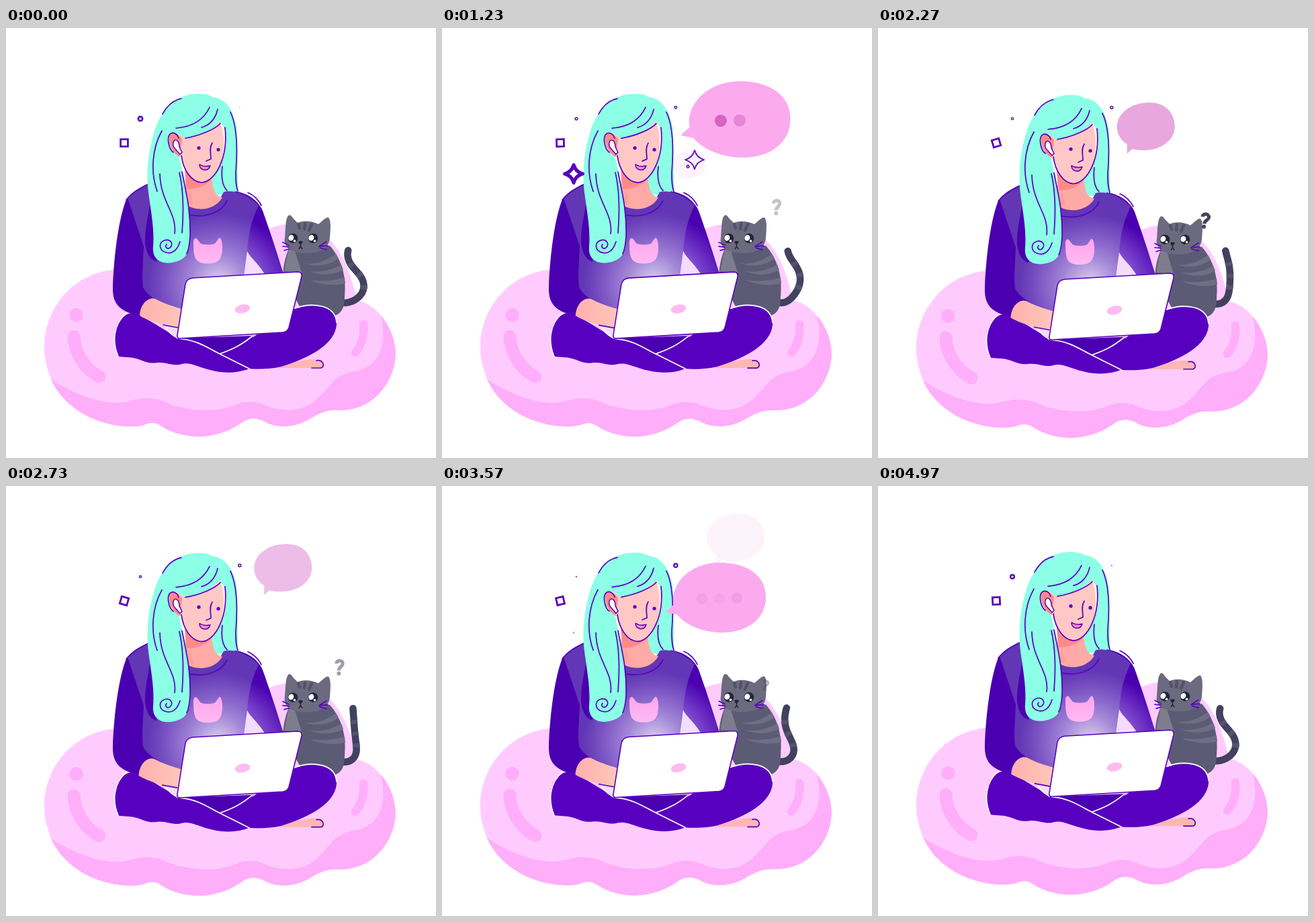
Animation, 640 px wide and 640 px high, one loop 5.01 s. Source, as an HTML page:

```html
<!DOCTYPE html>
<html lang="en">
<head>
<meta charset="utf-8">
<title>Cosy coding</title>
<style>
  html, body { margin: 0; width: 100%; height: 100%; overflow: hidden; background: #fff; }
  svg { display: block; width: 100vw; height: 100vh; }
  .line { fill: none; stroke: #5800bf; stroke-width: 1.7; stroke-linecap: round; stroke-linejoin: round; }
  .white { fill: none; stroke: #fff; stroke-width: 1.7; stroke-linecap: round; }
  .soft { fill: none; stroke: #ffaefa; stroke-linecap: round; }
  .star { fill: #fff; stroke: #5800bf; stroke-linejoin: round; }
  .ring { fill: #fff; stroke: #5800bf; }
</style>
</head>
<body>
<svg viewBox="0 0 640 640">
  <defs>
    <radialGradient id="glow" gradientUnits="userSpaceOnUse" cx="316" cy="380" r="106">
      <stop offset="0" stop-color="#fff" stop-opacity=".8"/>
      <stop offset=".4" stop-color="#efe6ff" stop-opacity=".45"/>
      <stop offset="1" stop-color="#d9c8ff" stop-opacity="0"/>
    </radialGradient>
    <linearGradient id="arm" x1="0" y1="0" x2="0" y2="1">
      <stop offset=".4" stop-color="#4a00b0"/>
      <stop offset="1" stop-color="#5614ba"/>
    </linearGradient>
    <linearGradient id="skin" x1="0" y1="0" x2="1" y2="0">
      <stop offset="0" stop-color="#ffb0ae"/>
      <stop offset="1" stop-color="#ffc6ba"/>
    </linearGradient>
    <linearGradient id="badge" x1="0" y1="0" x2="0" y2="1">
      <stop offset="0" stop-color="#ffa6ee"/>
      <stop offset="1" stop-color="#ffb9f2"/>
    </linearGradient>
    <path id="cloud" d="M57 475C57 430 85 375 150 361C230 350 330 350 375 310C400 287 440 287 470 305C500 325 515 370 522 405C555 412 580 450 580 487C577 530 545 570 495 569C478 568 470 572 455 580C430 597 400 595 385 586C372 579 360 580 350 588C325 605 300 609 280 608C255 606 240 598 232 593C222 586 215 587 205 591C180 598 100 590 68 525C60 505 57 490 57 475Z"/>
    <clipPath id="inCloud"><use href="#cloud"/></clipPath>
    <clipPath id="inTop">
      <path d="M213 231L177 258C166 290 160 350 159 385C158 410 170 422 200 428L258 420H300L354 368L359 334L385 366H413C402 330 392 300 382 272L345 243L322 252L268 265Z"/>
    </clipPath>
    <path id="star" d="M0-14Q3-3 14 0Q3 3 0 14Q-3 3-14 0Q-3-3 0-14Z"/>
  </defs>

  <g id="scene">
    <!-- cloud -->
    <use href="#cloud" fill="#ffcbff"/>
    <path clip-path="url(#inCloud)" fill="#ffaefa" d="M558 430C566 460 562 503 520 511C490 515 485 530 470 545C440 580 400 568 380 559C360 552 345 560 330 565C300 573 260 567 240 558C220 548 200 550 185 555C150 565 100 545 66 522L50 640H600V430Z"/>
    <circle cx="104.500" cy="427" r="10.300" fill="#ffaefa"/>
    <path class="soft" stroke-width="19" d="M101 459C102 485 118 508 139 519"/>
    <path class="soft" stroke-width="12.500" d="M532 441C534 458 528 474 520 483"/>

    <!-- cat -->
    <g fill="none" stroke-width="10.500" stroke-linejoin="round">
      <path id="tail" stroke="#42415f" stroke-linecap="round"/>
      <path id="bands" stroke="#54536e" pathLength="100" stroke-dasharray="0 40 6 12 6 12 6 100"/>
    </g>
    <path fill="#5c5b75" d="M421 328C416 340 413 352 412 368L440 420L490 428C500 424 504 416 504 400C507 370 500 345 482 324Z"/>
    <path fill="#6f6e83" d="M444 350C462 353 480 345 491 336L495 343C482 353 462 357 444 350ZM451 362C470 365 490 358 499 352L502 360C487 368 468 369 451 362ZM452 375C472 378 490 376 504 371L505 380C488 384 468 383 452 375Z"/>
    <path fill="#9a99a3" opacity=".55" d="M421 328L414 362L440 364L430 332Z"/>
    <path fill="#6b6a7f" d="M415 312C416 300 416 286 419 281C421 276 425 279 427 283L434 290C443 286 455 287 465 292C470 288 476 281 480 282C484 286 483 300 482 312C481 328 466 336 446 335C425 335 412 326 415 312Z"/>
    <path fill="none" stroke="#535269" stroke-width="4.500" stroke-linecap="round" d="M435 292L437 298M445 291L444 299M455 292L451 301"/>
    <g id="eye">
      <circle cx="427" cy="313" r="7.300" fill="#25253a"/>
      <ellipse cx="424.500" cy="312.500" rx="3.900" ry="4.500" fill="#fff" transform="rotate(25 425 312)"/>
      <circle cx="429.500" cy="317" r="1.800" fill="#fff"/>
    </g>
    <use href="#eye" x="30"/>
    <path fill="#25253a" d="M435 318Q438 316 442 318Q440 322 438.500 322Q436 322 435 318Z"/>
    <path fill="none" stroke="#25253a" stroke-width="1.500" d="M438.500 321V325L436 329M438.500 325L441 329"/>
    <path class="line" d="M466 325L477 318M467 325L479 324M467 327L477 330M412 319L421 323M412 325L421 326M414 331L421 329"/>

    <!-- body -->
    <path fill="#8cffe6" d="M300 205L307 238C309 250 320 251 330 245L346 244C343 220 347 165 342 145C336 120 320 105 308 103Z"/>
    <path fill="#f4dcff" d="M358 325L354 370H388Z"/>
    <path fill="#4a00b0" d="M213 231C195 239 182 248 178 258C166 290 160 350 159 385C158 412 170 422 200 429L240 420L225 300Z"/>
    <path fill="url(#arm)" d="M340 243C365 246 378 262 382 272C392 300 402 330 413 366H385C375 350 362 340 359 332Z"/>
    <path fill="#6236b5" d="M181 253C190 244 200 237 213 232L268 262C290 274 312 268 324 244C340 240 362 249 376 264C368 282 362 296 359 332L354 368L300 420H258C235 412 212 402 204 386C202 370 204 350 205 325Z"/>
    <path fill="#4a00b0" d="M214 231C220 262 206 285 207 320C209 336 214 344 224 348L232 300Z"/>
    <path fill="#ffaaa6" d="M266 205L268 263C288 276 314 268 322 252C312 250 308 243 306 220Z"/>
    <path fill="#ff8a87" d="M266 208L269 240C285 240 300 234 308 222Z"/>
    <path fill="#ff8a87" opacity=".35" d="M274 240L279 262L268 264Z"/>
    <path class="line" d="M273 278C297 283 321 275 329 257M360 245C368 248 376 256 380 264M213 232C196 240 184 249 179 256"/>
    <rect x="150" y="230" width="280" height="210" fill="url(#glow)" clip-path="url(#inTop)"/>
    <path fill="url(#badge)" d="M279 322C278 314 282 309 286 316L290 321C297 323 304 323 311 321L316 314C319 309 322 316 322 326C322 345 316 350.500 300 350.500C284 350.500 279 345 279 322Z"/>

    <!-- legs -->
    <path fill="#ffb6b4" d="M405 506C425 500 437 493 460 493C470 494 476 502 472 506Z"/>
    <path class="line" d="M455 506H469C476 503 471 493 462 495"/>
    <path fill="#5800bf" d="M167 489C158 468 159 440 175 429C185 422 194 423 202 430C225 440 245 458 262 461L368 460L424 420C455 408 493 412 492 442C489 470 455 490 410 504C392 508 375 508 362 507C345 514 325 514 308 510C285 505 275 497 262 500C248 504 240 497 226 498C205 501 203 491 180 490Z"/>
    <path fill="#4a00b0" d="M262 462L368 458C350 473 338 478 318 485C300 474 285 465 262 462Z"/>
    <path fill="#efe0ff" opacity=".85" d="M232 441L258 445L255 463Z"/>
    <path class="white" d="M167 489C158 468 159 440 180 424M430 417C455 408 490 411 492 438M238 447C246 457 253 462 262 463C285 465 300 476 318 485L362 507M318 485C338 478 350 472 366 459"/>

    <g id="hand">
      <path fill="url(#skin)" d="M199 428C200 410 212 400 222 403C235 410 250 415 262 418L257 446C235 443 215 437 199 428Z"/>
      <path class="line" stroke-width="1.400" d="M234 442L256 446"/>
    </g>

    <g id="laptop">
      <path fill="#fff" stroke="#5800bf" stroke-width="1.600" d="M267 381Q269 373 278 372L434 363Q441 363 440 370L421 446Q419 452 412 453L259 462Q254 462 255 457Z"/>
      <ellipse cx="352" cy="418" rx="11.500" ry="6.500" fill="#fdbbf0" transform="rotate(-12 352 418)"/>
    </g>

    <!-- head -->
    <path fill="#ffc8c6" d="M258 180C262 210 275 230 291 230C312 230 328 195 328 165C328 148 322 140 318 134L255 155Z"/>
    <path fill="#fff0ee" d="M317 136C324 152 327 175 319 203C327 187 329 170 328 160C327 148 322 139 317 136Z"/>
    <path fill="#8cffe6" d="M288 98C255 97 232 120 222 150C212 180 208 215 212 245C216 275 221 300 219 325C217 345 232 352 248 349C268 345 274 335 274 310C274 270 266 225 257 190L246 182L243 160L254 156L266 164C290 160 311 150 318 138C326 148 328 158 328 165L344 152C339 120 325 104 308 103C302 99 295 98 288 98Z"/>
    <path fill="#ff8a87" d="M243 164C242 156 250 153 256 159L262 165L259 192C248 186 243 176 243 164Z"/>
    <path class="line" d="M249 185C242 180 239 163 244 158C248 154 255 157 257 164"/>
    <path fill="#fff" stroke="#5800bf" stroke-width="1.500" d="M250 168C253 164 258 169 258 177L262 185L259 188L252 180C248 177 248 171 250 168Z"/>
    <path class="line" d="M261 190C264 212 276 229 291 230C312 229 331 192 326 148M307 171C302 179 305 187 305 195L298 198"/>
    <path fill="#ff8fb8" stroke="#5800bf" stroke-width="1.500" stroke-linejoin="round" d="M288 203C294 207 300 206 304 205C302 211 298 212 294 211C290 210 288 207 288 203Z"/>
    <circle cx="287" cy="178.500" r="2.600" fill="#5800bf"/>
    <circle cx="316" cy="181" r="2.600" fill="#5800bf"/>
    <path class="line" d="M233 128C240 115 250 107 261 105M225 243C215 215 217 180 232 153M229 217C230 260 255 275 251 306M258 215C265 245 264 280 262 305M253 149C280 147 295 135 303 118M291 148C303 145 312 135 315 121M267 164C290 160 312 150 319 142M334 125C346 150 344 190 342 215C342 227 342 235 345 243M322 206C320 222 322 235 329 242M262 214C268 245 275 270 274 310C273 325 272 330 269 336"/>
    <path class="line" d="M259 318C255 331 247 337 238 334C227 331 227 319 236 316C245 313 250 322 244 327C240 330 236 326 239 322"/>

    <!-- sparkles -->
    <use id="bigStar" href="#star" class="star" stroke-width="5.500"/>
    <use id="thinStar" href="#star" class="star" stroke-width="2"/>
    <use id="tinyStar" href="#star" class="star" stroke-width="4"/>
    <circle id="bead" class="ring" r="1.800" stroke-width="1.700"/>
  </g>

  <circle id="ringA" class="ring" r="3.100" stroke-width="2.700"/>
  <circle id="ringB" class="ring" r="2.900" stroke-width="2.300"/>
  <rect id="box" x="-5.400" y="-5.400" width="10.800" height="10.800" fill="#fff" stroke="#5800bf" stroke-width="2.800"/>

  <g id="ask" fill="none" stroke="#45445a">
    <path stroke-width="5" d="M-4.500-5C-4.500-11 5-11 5-5C5-.5-.5-1 -.5 5"/>
    <circle cy="9.500" cx="-.5" r="3" fill="#45445a" stroke="none"/>
  </g>

  <path id="thought" fill="#e8a8df" d="M-43 0C-43-20-22-36 5-36C30-36 43-20 43 0C43 20 22 36-5 35C-12 35-17 34-20 33L-28 40L-28 26C-38 20-43 10-43 0Z"/>
  <g id="talk">
    <path fill="#fcaaee" d="M-75 4C-74-30-40-56 0-56C45-56 75-35 75 0C75 35 45 57 5 57C-25 57-55 45-68 28L-87 24L-74 12Z"/>
    <g fill="#d25fc0">
      <circle cx="-28" cy="2.500" r="9"/><circle cy="2" r="9"/><circle cx="28" cy="1" r="9"/>
    </g>
  </g>
</svg>

<script>
const LOOP = 5010;
const $ = id => document.getElementById(id);
const dots = [...$('talk').querySelectorAll('circle')];

const wave = turns => Math.cos(2 * Math.PI * turns);
const mix = (a, b, k) => a + (b - a) * k;
const ramp = (t, from, to) => Math.min(1, Math.max(0, (t - from) / (to - from)));
const smooth = k => k * k * (3 - 2 * k);
// Rises between a and b, falls between c and d
const pulse = (t, a, b, c, d) => Math.min(ramp(t, a, b), 1 - ramp(t, c, d));

function place(el, x, y, scale = 1, turn = 0, opacity = 1) {
  el.setAttribute('transform', `translate(${x} ${y}) rotate(${turn}) scale(${scale})`);
  el.style.opacity = scale > .005 ? opacity : 0;
}

// A chain of short links whose heading carries a wave from root to tip
function tailPath(turn) {
  const links = 24, step = (94 + 6 * wave(turn)) / links;
  let x = 506, y = 409, d = `M497 409L${x} ${y}`;
  for (let i = 0; i < links; i++) {
    const s = (i + .5) / links;
    const sway = 19 * Math.min(1, s / .3) * wave(turn - s + .65);
    const angle = (5 + 108 * Math.sin(2.3 * s) + sway) * Math.PI / 180;
    x += step * Math.cos(angle);
    y -= step * Math.sin(angle);
    d += `L${x.toFixed(2)} ${y.toFixed(2)}`;
  }
  return d;
}

// The speech bubble passes twice per loop
function drawTalk(t) {
  const s = t - (t < 2700 ? 330 : 3130);
  const size = 1.007 - .295 * (1 - Math.min(1, s / 950)) ** 2;
  place($('talk'), 384 + .0655 * s, 194.5 - .0655 * s, size, 0, pulse(s, -250, 250, 950, 1500));
  dots.forEach((dot, i) => {
    const blink = .55 + .45 * wave((s + 80 - 80 * i) / 900);
    dot.style.opacity = blink * (1 - ramp(s, 1000 - 200 * i, 1200 - 200 * i));
  });
}

function drawThought(t) {
  const k = (t - 1230) / 2340;
  place($('thought'), mix(368, 437, k), mix(203, 77, k),
    mix(.58, 1, ramp(t, 1230, 2000)), 0, pulse(t, 1150, 1800, 2400, 3750));
}

function drawAsk(t) {
  const p = t % (LOOP / 3);
  const k = smooth(ramp(p, 150, 1300));
  place($('ask'), mix(481, 498, k), mix(297, 266, k),
    mix(.6, 1, ramp(p, 150, 500)), 12 * (1 - k), pulse(p, 170, 320, 650, 1500));
}

function drawSparkles(t) {
  const p = t % (LOOP / 2);
  place($('bigStar'), 196, 217, .95 * pulse(p, 1050, 1230, 1450, 1890));
  place($('thinStar'), 376, 196, pulse(p, 1090, 1230, 1400, 1750));
  place($('tinyStar'), 198, 172, .4 * pulse(p, 1215, 1500, 1800, 2050));
  place($('bead'), 366, 206, pulse(p, 1100, 1230, 1500, 1950));
}

function draw(t) {
  const beat = t / (LOOP / 4) % 1;
  const lift = (1 - Math.abs(1 - 2 * beat) + .5 - .5 * wave(beat)) / 2;
  place($('scene'), 0, 5.2 * lift);
  place($('laptop'), 0, .8 * lift);
  place($('box'), 176, 171, 1, 90 * beat);

  const swell = Math.abs(1 - 2 * (t / (LOOP / 5) % 1));
  place($('ringA'), 200, 135, .23 + .77 * swell ** 1.3);
  place($('ringB'), 347.8, 118.3, .14 + .86 * (1 - swell) ** .8);

  const tap = .5 - .5 * wave(32 * t / LOOP);
  place($('hand'), -1.5 * tap, 1.5 * tap);

  const tail = tailPath(t / LOOP);
  $('tail').setAttribute('d', tail);
  $('bands').setAttribute('d', tail);

  drawSparkles(t);
  drawAsk(t);
  drawThought(t);
  drawTalk(t);
}

const start = performance.now();
function tick() {
  draw((performance.now() - start) % LOOP);
  requestAnimationFrame(tick);
}
tick();
</script>
</body>
</html>
```
